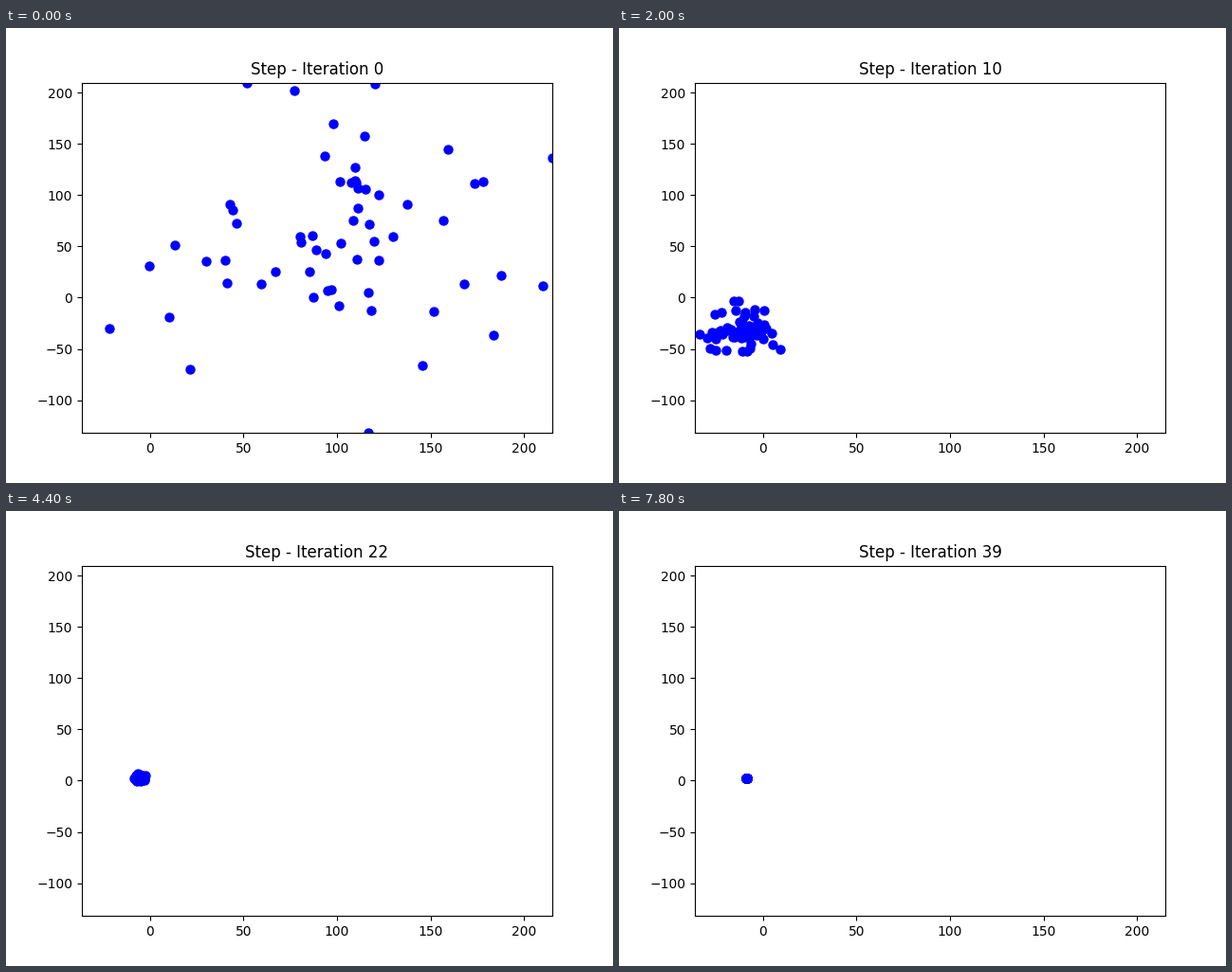
A matplotlib script for the animation above (8 s loop, 640x480 px).

```python
import numpy as np
import matplotlib.pyplot as plt
from matplotlib.animation import FuncAnimation

FRAMES, INTERVAL = 40, 200
COUNT = 60
XLIM, YLIM = (-36.5, 215.2), (-132.05, 209.9)
DECAY = 0.843

# Swarm centre: step, x, y
PATH = np.array([
    (0, 101, 59), (3, 113, -31), (7, 42, -47), (10, -11, -32),
    (14, -2.5, -8), (17, -3, -1.5), (28, -8.4, 2), (39, -8.8, 2.2),
])

# Outermost particles at the start
OUTER = np.array([(52, 209.9), (117, -132), (215.2, 136), (210, 12), (-22, -30)])


def cloud(rng, n, spread):
    """Normal scatter without far outliers, centred on zero."""
    z = np.clip(rng.normal(size=(n, 2)), -2.1, 2.1)
    return (z - z.mean(axis=0)) / z.std(axis=0) * spread


def centre(k):
    """Cubic Hermite curve through the path points."""
    t, p = PATH[:, 0], PATH[:, 1:]
    slope = np.gradient(p, t, axis=0)
    i = min(np.searchsorted(t, k, side="right") - 1, len(t) - 2)
    h = t[i + 1] - t[i]
    u = (k - t[i]) / h
    return ((1 + 2 * u) * (1 - u) ** 2 * p[i]
            + u * (1 - u) ** 2 * h * slope[i]
            + u * u * (3 - 2 * u) * p[i + 1]
            + u * u * (u - 1) * h * slope[i + 1])


rng = np.random.default_rng(7)
inner = cloud(rng, COUNT - len(OUTER), (44, 60)) + (100, 61)
points = np.vstack((OUTER, inner))
offset = points - points.mean(axis=0)
swing = cloud(rng, COUNT, (58, 62))
omega = rng.uniform(0.35, 0.7, (COUNT, 1))


def swarm(k):
    """Each particle is a damped oscillator around the moving centre."""
    if k == 0:
        return points
    d = offset * np.cos(omega * k) + swing * np.sin(omega * k)
    return centre(k) + DECAY ** k * (d - d.mean(axis=0))


fig, ax = plt.subplots(figsize=(6.4, 4.8), dpi=100)
ax.set_xlim(XLIM)
ax.set_ylim(YLIM)
dots = ax.scatter(points[:, 0], points[:, 1], s=42, color="blue")
title = ax.set_title("Step - Iteration 0")


def update(k):
    dots.set_offsets(swarm(k))
    title.set_text(f"Step - Iteration {k}")
    return dots, title


anim = FuncAnimation(fig, update, frames=FRAMES, interval=INTERVAL,
                     repeat=True, repeat_delay=0)
plt.show()
```
